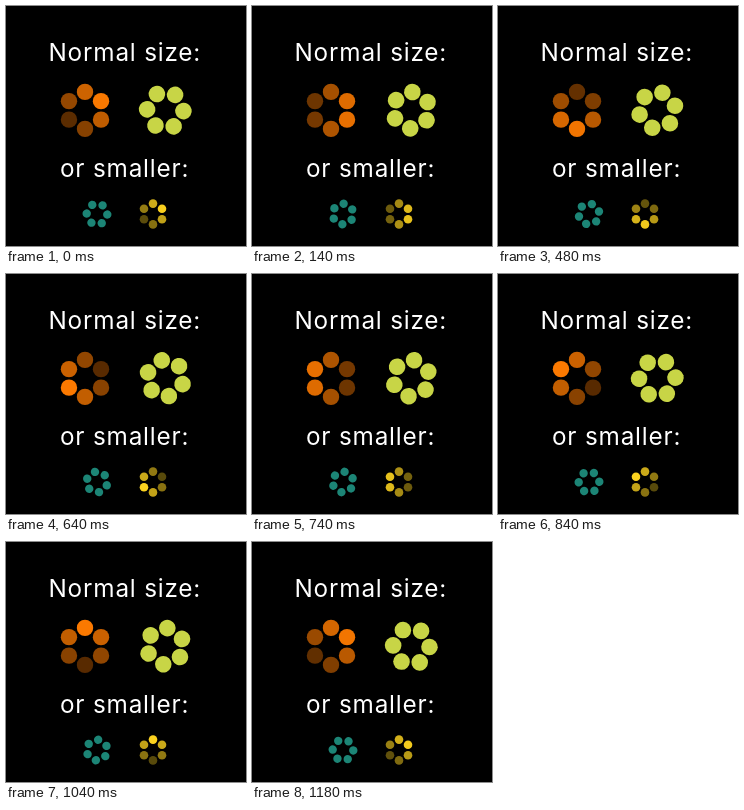
An HTML page for the animation above (1200 ms loop, 240 px wide and 240 px high).

```html
<!DOCTYPE html>
<html lang="en">
<head>
<meta charset="utf-8">
<title>Loading indicators</title>
<style>
  html, body { margin: 0; width: 100%; height: 100%; overflow: hidden; background: #000; }
  svg { display: block; width: 100vw; height: 100vh; }
  text { font: 400 24.3px Inter, Roboto, sans-serif; letter-spacing: .8px; fill: #fff; }
</style>
</head>
<body>
<svg id="stage" viewBox="0 0 240 240">
  <text x="42.5" y="55">Normal size:</text>
  <text x="54" y="171">or smaller:</text>
</svg>
<script>
const LOOP = 1200, DOTS = 6, STEP = 360 / DOTS;
const stage = document.getElementById('stage');

function spinner(x, y, ring, radius, color) {
  const group = document.createElementNS(stage.namespaceURI, 'g');
  group.setAttribute('fill', color);
  const dots = Array.from({ length: DOTS }, (_, i) => {
    const dot = document.createElementNS(stage.namespaceURI, 'circle');
    const a = i * STEP * Math.PI / 180;
    dot.setAttribute('cx', ring * Math.sin(a));
    dot.setAttribute('cy', -ring * Math.cos(a));
    dot.setAttribute('r', radius);
    group.append(dot);
    return dot;
  });
  stage.append(group);
  const turn = deg => group.setAttribute('transform', `translate(${x} ${y}) rotate(${deg})`);
  turn(0);
  return { dots, turn };
}

const faders = [
  spinner(79, 104.4, 18.5, 8.2, '#ff7b00'),
  spinner(147, 208, 10.4, 4.3, '#ffd51f')
];
const rotors = [
  spinner(159.3, 104.2, 18.2, 8.3, '#c8d546'),
  spinner(91, 208, 10.3, 4.2, '#1c8576')
];

// Brightness falls off linearly with the angle from the moving peak.
function fade({ dots }, peak) {
  dots.forEach((dot, i) => {
    const d = Math.abs(((i * STEP - peak) % 360 + 540) % 360 - 180);
    dot.setAttribute('opacity', 1 - .67 * d / 180);
  });
}

function draw(ms) {
  const t = ms % LOOP;
  const peak = 52 + 360 * t / LOOP;
  const u = Math.min(1, t / 1180);
  const angle = 32.5 + 240 * u + 6 * Math.sin(Math.PI * u);
  faders.forEach(s => fade(s, peak));
  rotors.forEach(s => s.turn(angle));
}

const start = performance.now();
function tick() {
  draw(performance.now() - start);
  requestAnimationFrame(tick);
}
tick();
</script>
</body>
</html>
```
